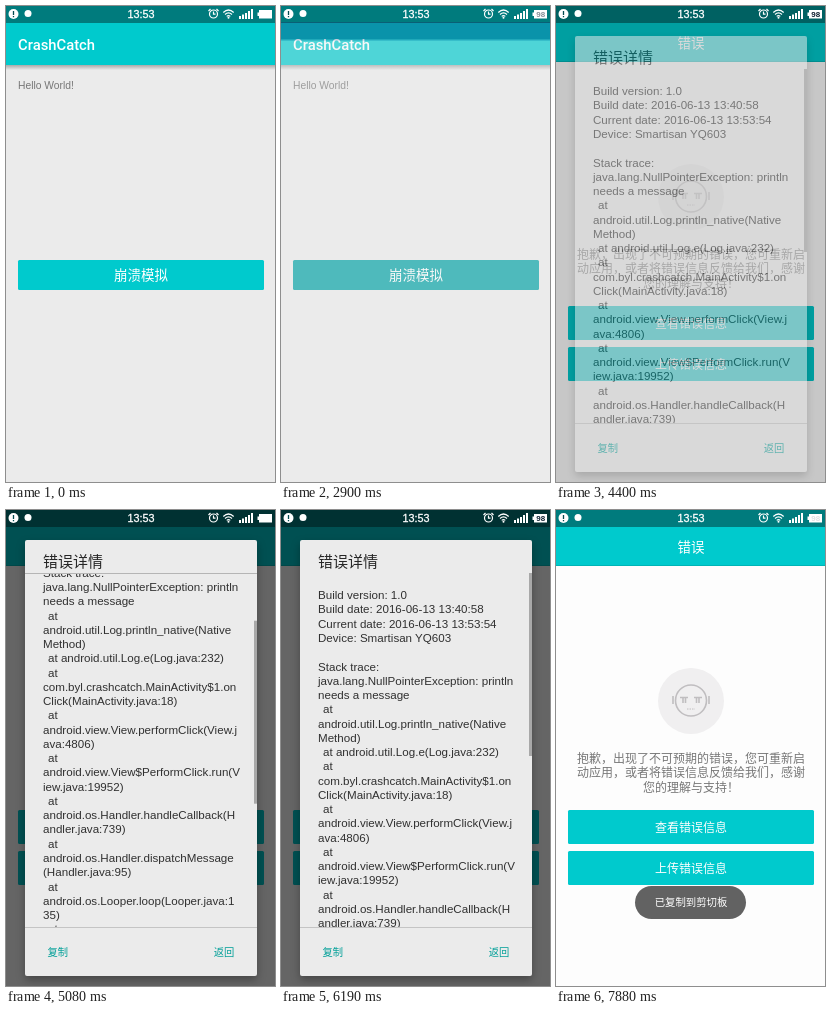
An HTML page that plays this animation: 269x476 px, repeating every 8000 ms.

```html
<!DOCTYPE html>
<html lang="zh">
<head>
<meta charset="utf-8">
<style>
html, body { margin: 0; height: 100%; overflow: hidden; background: #ebebeb; }
svg { display: block; width: 100vw; height: 100vh; }
text { font-family: "Liberation Sans", "Noto Sans CJK SC", sans-serif; }
.cjk { font-family: "Noto Sans CJK SC", "Noto Sans CJK", sans-serif; }
.mid { text-anchor: middle; }
.white { fill: #fff; }
</style>
</head>
<body>
<svg viewBox="0 0 269 476" preserveAspectRatio="none">
  <defs>
    <linearGradient id="shade" x2="0" y2="1">
      <stop offset="0" stop-color="#a9a9a9"/><stop offset="1" stop-color="#ebebeb"/>
    </linearGradient>
    <clipPath id="view"><rect x="19" y="63" width="232" height="355"/></clipPath>
  </defs>

  <g id="home">
    <rect width="269" height="476" fill="#ebebeb"/>
    <rect y="59" width="269" height="5" fill="url(#shade)"/>
    <rect width="269" height="59" fill="#00cacd"/>
    <rect width="269" height="17" fill="#007b7d"/>
    <text x="12" y="44.3" font-size="14.8" class="white" style="font-family:Roboto,sans-serif;font-weight:500">CrashCatch</text>
    <text x="12" y="83" font-size="10.3" fill="#777">Hello World!</text>
    <rect id="crash" x="12" y="254" width="246" height="30" rx="1.5"/>
    <text x="135" y="274" font-size="13.5" class="cjk mid white">崩溃模拟</text>
  </g>

  <g id="blank">
    <rect width="269" height="500" fill="#ebebeb"/>
    <rect width="269" height="18" fill="#1f2866"/>
    <rect y="17.5" width="269" height="1.5" fill="#a5a8c6"/>
  </g>

  <g id="error">
    <rect width="269" height="476" fill="#fdfdfd"/>
    <rect width="269" height="55.500" fill="#00cacd"/>
    <rect y="55" width="269" height="1" fill="#00b4b6"/>
    <rect width="269" height="17" fill="#007b7d"/>
    <text x="135" y="41.5" font-size="13.5" class="cjk mid white">错误</text>
    <circle cx="135" cy="191" r="33" fill="#f0eff0"/>
    <g fill="none" stroke="#c0bec0" stroke-width="1.6">
      <circle cx="135" cy="190.5" r="15.5"/>
      <path d="M117 186v8M153 186v8M124 187.5h8M138 187.5h8M127 188v5M129.500 188v5M140.500 188v5M143 188v5"/>
      <path d="M131 199h8" stroke-width="1" stroke-dasharray="1.500 1"/>
    </g>
    <g class="mid" font-size="12" fill="#777">
      <text class="cjk" x="135" y="252.500">抱歉，出现了不可预期的错误，您可重新启</text>
      <text class="cjk" x="135" y="267">动应用，或者将错误信息反馈给我们，感谢</text>
      <text class="cjk" x="135" y="281.500">您的理解与支持！</text>
    </g>
    <rect x="12" y="300" width="246" height="34" rx="1.5" fill="#00cacd"/>
    <rect x="12" y="341" width="246" height="34" rx="1.5" fill="#00cacd"/>
    <text x="135" y="321.500" font-size="12" class="cjk mid white">查看错误信息</text>
    <text x="135" y="362.500" font-size="12" class="cjk mid white">上传错误信息</text>
  </g>

  <rect id="dim" width="269" height="476"/>

  <g id="dialog">
    <rect x="19" y="30" width="232" height="436" rx="2" fill="#ebebeb" style="filter:drop-shadow(0 4px 4px rgba(0,0,0,.3))"/>
    <text x="37" y="57.300" font-size="15" class="cjk" fill="#262626">错误详情</text>
    <g clip-path="url(#view)">
      <g id="trace" font-size="11.6" fill="#303030"></g>
      <rect id="thumb" x="248" width="3" height="183" fill="#a8a8a8"/>
    </g>
    <rect id="topLine" x="19" y="63" width="232" height="1" fill="#b5b5b5"/>
    <rect id="endLine" x="19" y="417" width="232" height="1" fill="#c4c4c4"/>
    <g font-size="10.3" fill="#009f98">
      <text class="cjk" x="41.500" y="446">复制</text>
      <text class="cjk" x="207.700" y="446">返回</text>
    </g>
  </g>

  <g id="toast">
    <rect x="79" y="376" width="111" height="33" rx="16.5" fill="#626262"/>
    <text x="135" y="395.800" font-size="10.4" class="cjk mid white">已复制到剪切板</text>
  </g>

  <g id="status" fill="#fff">
    <circle cx="7.500" cy="8" r="5"/>
    <path d="M7.500 5v4M7.500 10v1.300" stroke="#044a50" stroke-width="1.300"/>
    <circle cx="22" cy="7.500" r="3.500"/>
    <text x="135" y="12" font-size="10.8" class="mid" stroke="#fff" stroke-width=".3">13:53</text>
    <g fill="none" stroke="#fff" stroke-width="1.200">
      <circle cx="207.500" cy="8" r="4"/>
      <path d="M207.500 5.500v2.700h2M202.500 5l2-2M212.500 5l-2-2"/>
      <path d="M217.300 6.500q5.200-5 10.400 0M219 8.500q3.500-3.200 7 0M220.700 10.400q1.800-1.500 3.600 0"/>
    </g>
    <circle cx="222.500" cy="11.800" r="1"/>
    <path d="M233 10h2v3h-2zM236 8.500h2v4.500h-2zM239 7h2v6h-2zM242 5h2v8h-2zM245 3h2v10h-2z"/>
    <path d="M253 4h13v8.500h-13v-2.500h-1.500v-3.500h1.500z"/>
    <text id="level" x="259.700" y="11.200" font-size="8" class="mid" fill="#123" font-weight="bold">98</text>
  </g>
</svg>
<script>
const $ = id => document.getElementById(id);
const LOOP = 8000, LINE = 14.26, MAX_SCROLL = 338;

const report = `Build version: 1.0
Build date: 2016-06-13 13:40:58
Current date: 2016-06-13 13:53:54
Device: Smartisan YQ603

Stack trace:
java.lang.NullPointerException: println
needs a message
at
android.util.Log.println_native(Native
Method)
at android.util.Log.e(Log.java:232)
at
com.byl.crashcatch.MainActivity$1.on
Click(MainActivity.java:18)
at
android.view.View.performClick(View.j
ava:4806)
at
android.view.View$PerformClick.run(V
iew.java:19952)
at
android.os.Handler.handleCallback(H
andler.java:739)
at
android.os.Handler.dispatchMessage
(Handler.java:95)
at
android.os.Looper.loop(Looper.java:1
35)
at
android.app.ActivityThread.main(Activ
ityThread.java:5313)
at
java.lang.reflect.Method.invoke(Native
Method)
at
java.lang.reflect.Method.invoke(Metho
d.java:372)
at
com.android.internal.os.ZygoteInit$M
ethodAndArgsCaller.run(ZygoteInit.jav
a:1116)
at
com.android.internal.os.ZygoteInit.ma
in(ZygoteInit.java:809)`;

report.split("\n").forEach((line, i) => {
  const el = document.createElementNS("http://www.w3.org/2000/svg", "text");
  el.setAttribute("x", /^at\b/.test(line) ? 42 : 37);
  el.setAttribute("y", 89.2 + i * LINE);
  el.textContent = line;
  $("trace").append(el);
});

// The screen refreshes only at these moments.
const ticks = [0, 120, 250, 390, 510, 660, 2040, 2200, 2350, 2630, 2750, 2900, 3020, 3170, 3320,
  4400, 4520, 4650, 4800, 5080, 5230, 5350, 5500, 5650, 5800, 7010, 7130, 7250,
  7400, 7520, 7640, 7760, 7880];

const ramp = (t, a, b) => Math.min(1, Math.max(0, (t - a) / (b - a)));
const fade = (id, alpha) => {
  $(id).style.opacity = alpha;
  $(id).style.display = alpha > 0 ? "" : "none";
};
const shift = (id, y) => $(id).setAttribute("transform", `translate(0 ${y})`);

function draw(now) {
  const time = now % LOOP;
  const t = ticks.findLast(tick => tick <= time);

  $("crash").setAttribute("fill", t < 2630 ? "#00cacd" : t < 2750 ? "#00b3b6" : "#00a2a5");

  const open = ramp(t, 2800, 3100);
  fade("home", t < 3170 ? 1 : 0);
  fade("blank", t < 3320 ? open : 0);
  shift("blank", 36 * (1 - open) ** 2);
  fade("error", t >= 3320 ? 1 : 0);

  const stay = 1 - ramp(t, 7010, 7250);
  const shown = t >= 4400;
  fade("dim", shown ? 0.6 * ramp(t, 4310, 4560) * stay : 0);
  fade("dialog", shown ? ramp(t, 4270, 4520) * stay : 0);

  const down = ramp(t, 4900, 5350) ** 1.4;
  const scroll = t < 5080 || t >= 5800 ? 0 : MAX_SCROLL * down;
  shift("trace", -scroll);
  $("thumb").setAttribute("y", 63 + 172 * scroll / MAX_SCROLL);
  fade("topLine", scroll > 0 ? 1 : 0);
  fade("endLine", scroll < MAX_SCROLL ? 1 : 0);

  fade("toast", ramp(t, 7300, 7800));

  const pulse = t % 2600;
  fade("level", ramp(pulse, 0, 600) * (1 - ramp(pulse, 1960, 2350)));
}

const start = performance.now();
function loop() {
  draw(performance.now() - start);
  requestAnimationFrame(loop);
}
loop();
</script>
</body>
</html>
```
